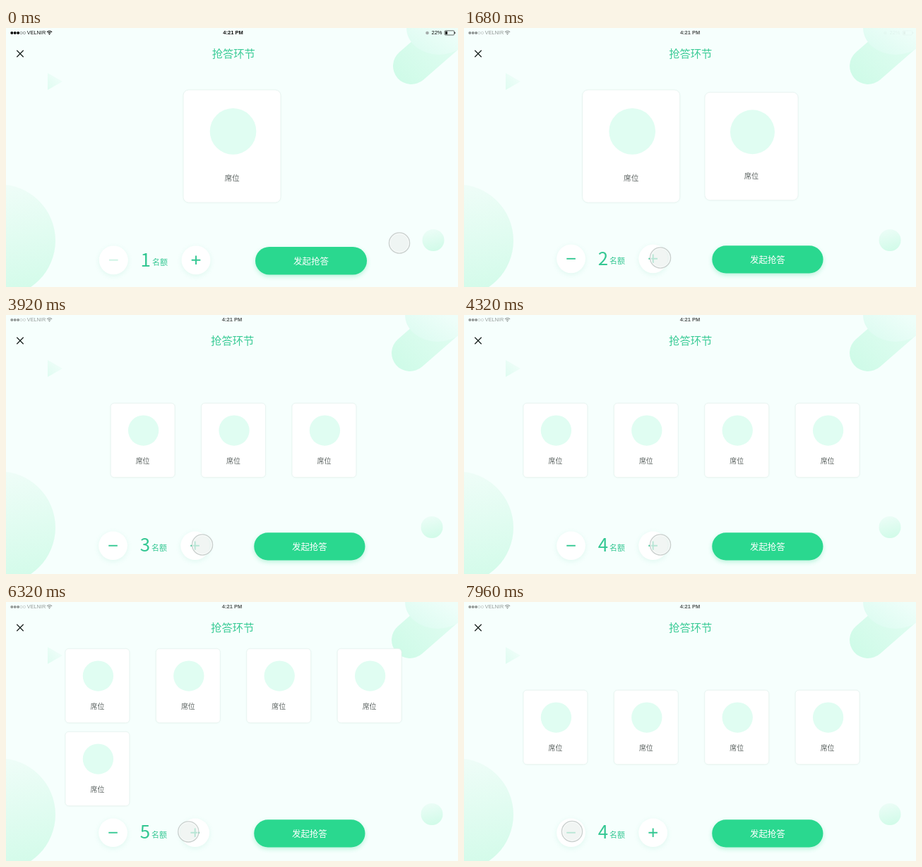
Recreate the animation shown at these times as an HTML page with a canvas. Size 640 by 368 pixels, loop 8 s.

```html
<!DOCTYPE html>
<html lang="zh-CN">
<head>
<meta charset="utf-8">
<title>抢答环节</title>
<style>
  html, body { margin: 0; width: 100%; height: 100%; overflow: hidden; background: #f6fffd; }
  canvas { display: block; width: 640px; height: 368px; }
</style>
</head>
<body>
<canvas id="stage"></canvas>
<script>
const W = 640, H = 368, LOOP = 8000;
const canvas = document.getElementById('stage');
const ctx = canvas.getContext('2d');
const dpr = window.devicePixelRatio || 1;
canvas.width = W * dpr;
canvas.height = H * dpr;

const CJK = '"Noto Sans CJK SC", "Noto Sans CJK", "Noto Sans", sans-serif';
const LATIN = '"Liberation Sans", Inter, sans-serif';
const GREEN = '#2ad88f', INK = '#33c792';

// Seat changes: start, duration, new seat count
const STEPS = [
  { at: 1400, dur: 360, to: 2 },
  { at: 2523, dur: 360, to: 3 },
  { at: 3940, dur: 360, to: 4 },
  { at: 5288, dur: 360, to: 5 },
  { at: 7120, dur: 520, to: 4 }
];
// Pointer travel: start, end, target
const MOVES = [
  { at: 510, end: 1290, x: 278, y: 326.5 },
  { at: 6110, end: 6730, x: 153, y: 326 }
];

const lerp = (a, b, p) => a + (b - a) * p;
const clamp = v => Math.max(0, Math.min(1, v));
const ease = p => p < 0.5 ? 4 * p ** 3 : 1 - 4 * (1 - p) ** 3;

function circle(x, y, r, fill) {
  ctx.beginPath();
  ctx.arc(x, y, r, 0, Math.PI * 2);
  ctx.fillStyle = fill;
  ctx.fill();
}

function box(x, y, w, h, r) {
  ctx.beginPath();
  ctx.roundRect(x, y, w, h, r);
}

function line(color, width, ...pts) {
  ctx.beginPath();
  for (let i = 0; i < pts.length; i += 4) {
    ctx.moveTo(pts[i], pts[i + 1]);
    ctx.lineTo(pts[i + 2], pts[i + 3]);
  }
  ctx.strokeStyle = color;
  ctx.lineWidth = width;
  ctx.stroke();
}

function text(str, x, y, font, color, align = 'center', base = 'middle') {
  ctx.font = font;
  ctx.fillStyle = color;
  ctx.textAlign = align;
  ctx.textBaseline = base;
  ctx.fillText(str, x, y);
}

function fade(x0, y0, x1, y1, from, to) {
  const g = ctx.createLinearGradient(x0, y0, x1, y1);
  g.addColorStop(0, from);
  g.addColorStop(1, to);
  return g;
}

function shadow(color, blur, dy) {
  ctx.shadowColor = color;
  ctx.shadowBlur = blur * dpr;
  ctx.shadowOffsetY = dy * dpr;
}

function drawBackdrop(k) {
  ctx.fillStyle = '#f6fffd';
  ctx.fillRect(0, 0, W, H);
  circle(-10, 302, 80, fade(0, 222, 30, 380, '#effdf8', '#d2fbe9'));

  ctx.beginPath();
  ctx.moveTo(59, 64);
  ctx.lineTo(80, 76);
  ctx.lineTo(59, 88);
  ctx.fillStyle = fade(59, 88, 80, 70, '#dffcf1', '#f1fefa');
  ctx.fill();

  ctx.save();
  ctx.translate(-2 * k, 0);
  ctx.save();
  ctx.translate(574, 54);
  ctx.rotate(-0.72);
  box(-26, -26, 170, 52, 26);
  ctx.fillStyle = fade(-26, 10, 100, 0, '#cffbe8', '#e6fdf4');
  ctx.fill();
  ctx.restore();
  ctx.beginPath();
  ctx.ellipse(613, 0, 46, 38, 0, 0, Math.PI * 2);
  ctx.fillStyle = fade(600, 38, 625, 0, '#dffcf2', '#eefef9');
  ctx.fill();
  circle(605, 301.5, 15.5, fade(600, 286, 608, 318, '#ecfdf7', '#d0fbe8'));
  ctx.restore();
}

function drawStatus(k) {
  ctx.save();
  ctx.globalAlpha = lerp(1, 0.42, k);
  for (let i = 0; i < 5; i++) {
    const x = 8.3 + i * 4.4;
    if (i < 3) {
      circle(x, 7, 2, '#111');
    } else {
      ctx.beginPath();
      ctx.arc(x, 7, 1.7, 0, Math.PI * 2);
      ctx.strokeStyle = '#444';
      ctx.lineWidth = 0.5;
      ctx.stroke();
    }
  }
  text('VELNIR', 29.8, 7.3, `7.3px ${LATIN}`, '#111', 'left');
  ctx.strokeStyle = '#111';
  ctx.lineWidth = 1.1;
  for (const r of [2.6, 4.7]) {
    ctx.beginPath();
    ctx.arc(61.5, 9, r, -Math.PI * 0.77, -Math.PI * 0.23);
    ctx.stroke();
  }
  circle(61.5, 8.7, 0.9, '#111');
  ctx.globalAlpha = lerp(1, 0.7, k);
  text('4:21 PM', 321.5 - 1.5 * k, 7.3, `bold 7.5px ${LATIN}`, '#111');

  ctx.globalAlpha = 1 - k;
  circle(596.5, 7, 2.3, '#a5adab');
  text('22%', 602.5, 7.3, `7.5px ${LATIN}`, '#111', 'left');
  box(621.2, 3.8, 13.4, 6.2, 1.2);
  ctx.strokeStyle = '#222';
  ctx.lineWidth = 0.7;
  ctx.stroke();
  ctx.fillStyle = '#111';
  ctx.fillRect(622.2, 4.8, 2.8, 4.2);
  ctx.fillRect(635.2, 5.8, 1, 2.2);
  ctx.restore();
}

function drawRound(x) {
  ctx.save();
  shadow('rgba(70, 200, 155, 0.13)', 7, 2);
  circle(x, 329.7, 20.5, '#fff');
  ctx.restore();
}

function drawControls(count, k) {
  ctx.save();
  ctx.scale(1 - 0.005 * k, 1 - 0.006 * k);
  drawRound(152.3);
  drawRound(269);
  line(count > 1 ? INK : '#cdf3e4', 1.9, 146, 329.7, 158.6, 329.7);
  line(INK, 1.9, 262.7, 329.7, 275.3, 329.7, 269, 323.4, 269, 336);
  text(count, 197.8, 338.5, `500 26px ${CJK}`, INK, 'center', 'alphabetic');
  text('名额', 207, 332.7, `500 11px ${CJK}`, INK, 'left');

  ctx.save();
  shadow('rgba(42, 216, 143, 0.3)', 6, 2.5);
  box(353, 311, 158, 39.5, 19.75);
  ctx.fillStyle = GREEN;
  ctx.fill();
  ctx.restore();
  text('发起抢答', 432, 331, `500 12.5px ${CJK}`, '#fff');
  ctx.restore();
}

function seat(n, i) {
  const small = n > 2, cols = Math.min(n, 4);
  const y = n > 4 ? (i < 4 ? 119 : 237) : small ? 178 : 168;
  return {
    x: (small ? 322 : 320) + (i % 4 - (cols - 1) / 2) * (small ? 128.4 : 174),
    y,
    w: small ? 91 : 138,
    scale: 1
  };
}

function drawCard({ x, y, w, scale }) {
  if (scale < 0.01) return;
  const h = w * 1.16;
  ctx.save();
  ctx.translate(x, y);
  ctx.scale(scale, scale);
  ctx.save();
  shadow('rgba(60, 150, 120, 0.06)', 3, 0.5);
  box(-w / 2, -h / 2, w, h, w * 0.056);
  ctx.fillStyle = '#fff';
  ctx.fill();
  ctx.restore();
  ctx.strokeStyle = '#e5f1ee';
  ctx.lineWidth = 0.8;
  ctx.stroke();
  circle(w * 0.011, -h * 0.132, w * 0.238, '#e0fdf2');
  const size = lerp(9.9, 10.6, (w - 91) / 47);
  text('席位', 0, h * 0.278, `${size}px ${CJK}`, '#5c6361');
  ctx.restore();
}

function drawCards(from, to, p) {
  const most = Math.max(from, to);
  for (let i = 0; i < most; i++) {
    if (i < from && i < to) {
      const a = seat(from, i), b = seat(to, i);
      drawCard({
        x: lerp(a.x, b.x, p),
        y: lerp(a.y, b.y, p),
        w: lerp(a.w, b.w, p),
        scale: 1
      });
    } else {
      drawCard({ ...seat(most, i), scale: to > from ? p : 1 - p });
    }
  }
}

function drawPointer(t) {
  let x = 557, y = 305.5;
  for (const m of MOVES) {
    const p = ease(clamp((t - m.at) / (m.end - m.at)));
    x = lerp(x, m.x, p);
    y = lerp(y, m.y, p);
  }
  circle(x, y, 14.6, 'rgba(236, 241, 239, 0.72)');
  ctx.strokeStyle = '#c9cfcd';
  ctx.lineWidth = 1.3;
  ctx.stroke();
  ctx.beginPath();
  ctx.arc(x, y, 13.3, 0, Math.PI * 2);
  ctx.strokeStyle = 'rgba(255, 255, 255, 0.6)';
  ctx.lineWidth = 1;
  ctx.stroke();
}

function draw(t) {
  let from = 1, to = 1, p = 1;
  for (const s of STEPS) {
    if (t < s.at) break;
    from = to;
    to = s.to;
    p = ease(clamp((t - s.at) / s.dur));
  }
  const k = ease(clamp((t - STEPS[0].at) / STEPS[0].dur));

  ctx.setTransform(dpr, 0, 0, dpr, 0, 0);
  drawBackdrop(k);
  drawStatus(k);
  line('#1c2422', 1.3, 15.3, 31.8, 24.7, 41.2, 24.7, 31.8, 15.3, 41.2);
  text('抢答环节', 322.3 - 1.6 * k, 36.5, `500 15.3px ${CJK}`, '#3acb96');
  drawCards(from, to, p);
  drawControls(to, k);
  drawPointer(t);
}

const begin = performance.now();
function tick() {
  draw((performance.now() - begin) % LOOP);
  requestAnimationFrame(tick);
}
tick();
</script>
</body>
</html>
```
